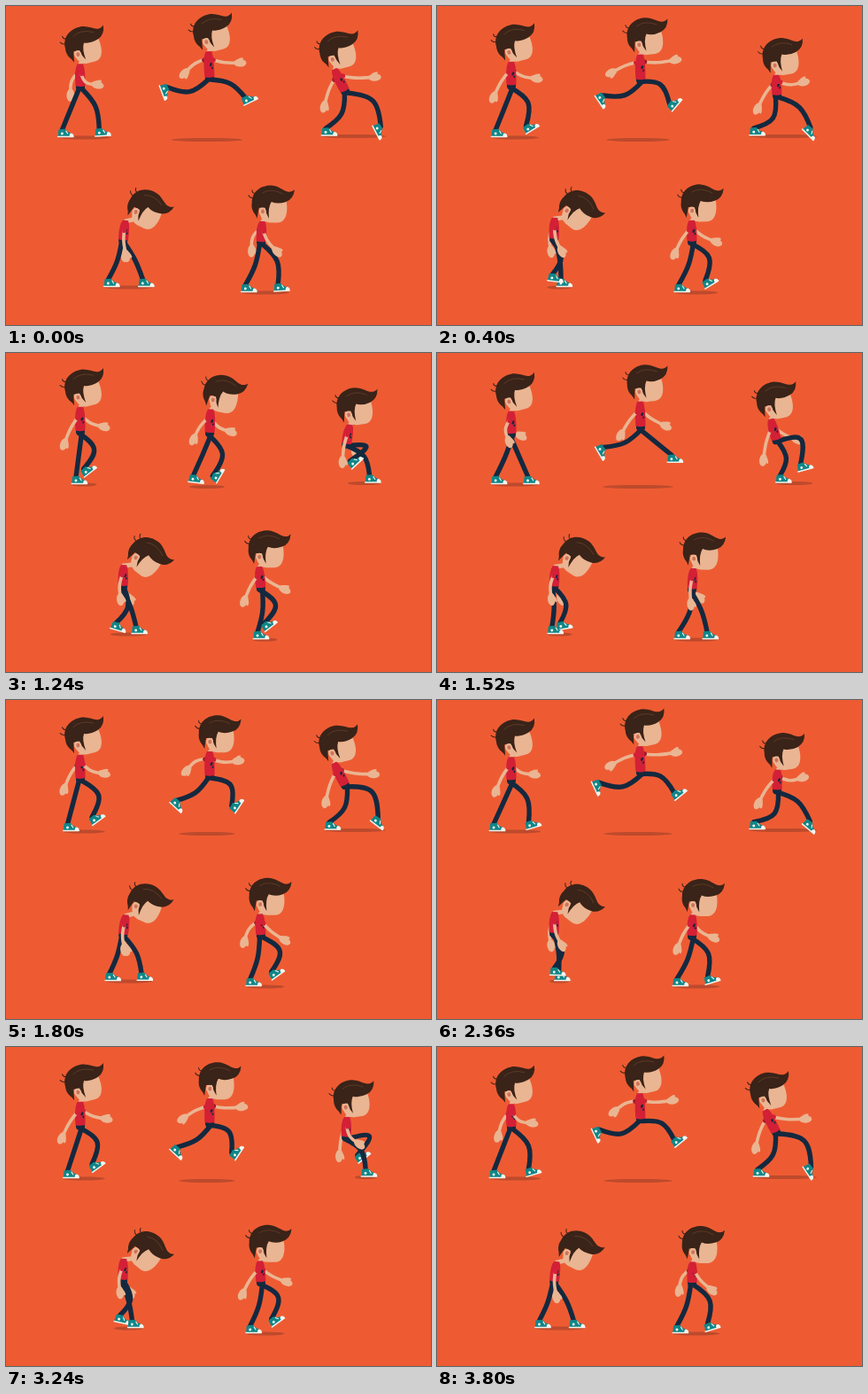
These frames come from a looping animation (480x360 px, 3.84 s). An HTML page with a canvas:

```html
<!DOCTYPE html>
<html lang="en">
<head>
<meta charset="utf-8">
<title>Walk cycles</title>
<style>
html, body { margin: 0; width: 100%; height: 100%; overflow: hidden; background: #ee5b33; }
canvas { display: block; width: 480px; height: 360px; }
</style>
</head>
<body>
<canvas id="stage" width="480" height="360"></canvas>
<script>
const LOOP = 3840, STEP = 40;
const BG = '#ee5b33', SHADE = '#bd4a2c', SKIN = '#eab592', HAIR = '#3a2318', LOCK = '#60402b',
  RED = '#d32036', RED2 = '#9c1a2d', NAVY = '#14293f', TEAL = '#0f8688', WHITE = '#f6f3ec';
const ctx = document.getElementById('stage').getContext('2d');

// Phases run from 0 to 1; wave peaks at `peak`, pulse is its upper half.
const wave = (p, peak = 0) => Math.cos(2 * Math.PI * (p - peak));
const pulse = (p, peak) => Math.max(0, wave(p, peak));
const lunge = p => Math.tanh(2.2 * (wave(p, .105) + .27));

// bob: ear shift x, y, head turn and hip drop, peaking at phase `low` of each step.
// stride, lift, fly: reach and height of the feet; knee: [always, in swing].
// arm: centre, reach, rise, sag and peak of the hand's arc.
const walkers = [
  { // walk
    cycle: 960, ground: 148.5, ear: [81, 52.5], tilt: -14, hip: [84, 92], low: .1, bob: [0, 2.5, 0, 1.5],
    mid: 88, stride: 21, lift: 12.5, toe: 38, heel: 25, knee: [0, 15],
    arm: { x: 87, y: 93, reach: 24, rise: 10, sag: 5, peak: .87, far: [2.5, -2] }
  },
  { // run
    cycle: 960, ground: 151, ear: [230, 47], tilt: -1, hip: [230, 88], low: .5, bob: [4, 6.5, 13, 5],
    mid: 227, stride: 48, lift: 8, fly: 24, toe: 60, heel: 70, knee: [0, 14],
    arm: { x: 231, y: 67, reach: 35, rise: 7, sag: 38, peak: .95, far: [4, -1] }
  },
  { // sneak
    cycle: 3840, ground: 147, ear: [381.5, 67], tilt: -9, hip: [384, 103], low: .46, bob: [13.5, 7, 5, 5],
    mid: 390, stride: 31, swing: lunge, lift: 20, toe: 45, heel: 15, dip: 70, knee: [8, 15],
    arm: { x: 388, y: 96, reach: 29, rise: 17, sag: 24, peak: .03, far: [0, 0] }
  },
  { // trudge
    cycle: 1920, ground: 317.5, ear: [146.5, 231.5], tilt: 32, hip: [132, 266], low: .37, bob: [0, -1, 7, -1],
    mid: 138.5, stride: 19.5, lift: 6, peak: .74, toe: 10, heel: 45, knee: [2, 8], stoop: -6,
    arm: { x: 135, y: 277, reach: 6, rise: 0, sag: 5, peak: .22, far: [0, 0] }
  },
  { // stroll
    cycle: 960, ground: 323.5, ear: [288, 231], tilt: 0, hip: [288, 268], low: .1, bob: [2, 1, 1, .7],
    mid: 292.5, stride: 18.5, lift: 13, toe: 38, heel: 28, knee: [3, 13],
    arm: { x: 291, y: 275, reach: 24, rise: 4, sag: 8, peak: .86, far: [2, -6] }
  }
];

const rad = deg => deg * Math.PI / 180;
const mix = (a, b, k) => [a[0] + (b[0] - a[0]) * k, a[1] + (b[1] - a[1]) * k];
const add = (a, b) => [a[0] + b[0], a[1] + b[1]];
const dist = (a, b) => Math.hypot(b[0] - a[0], b[1] - a[1]);
function turn([x, y], deg) {
  const c = Math.cos(rad(deg)), s = Math.sin(rad(deg));
  return [x * c - y * s, x * s + y * c];
}

function line(color, width, draw) {
  ctx.strokeStyle = color;
  ctx.lineWidth = width;
  ctx.beginPath();
  draw();
  ctx.stroke();
}
function fill(color, draw) {
  ctx.fillStyle = color;
  ctx.beginPath();
  draw();
  ctx.fill();
}
const oval = (color, x, y, rx, ry, a = 0) => fill(color, () => ctx.ellipse(x, y, rx, ry, a, 0, 7));
function local([x, y], angle, draw, scale = 1) {
  ctx.save();
  ctx.translate(x, y);
  ctx.rotate(angle);
  ctx.scale(scale, scale);
  draw();
  ctx.restore();
}

// Rubber limb from a to b, pushed sideways by `bend`; returns its joint.
function limb(a, b, bend, color, width) {
  const k = bend / (dist(a, b) || 1), mid = mix(a, b, .5);
  const joint = add(mid, [(b[1] - a[1]) * k, (a[0] - b[0]) * k]);
  const pull = mix(mid, joint, 1.55);
  line(color, width, () => {
    ctx.moveTo(...a);
    ctx.bezierCurveTo(...mix(pull, a, .15), ...mix(pull, b, .15), ...b);
  });
  return joint;
}

function footAt(w, p) {
  const up = pulse(p, w.peak || .82), fly = w.fly || 0;
  const hop = fly * (.9 + wave(2 * p, .98) - .2 * wave(p));
  const lift = Math.max(0, w.lift * up ** 3 + hop);
  const raised = Math.min(1, lift / 5);
  return {
    at: [w.mid + w.stride * (w.swing || wave)(p), w.ground - 4 - lift],
    lift,
    angle: (w.heel * pulse(p, .52) - w.toe * up) * raised + (w.dip || 0) * pulse(p, .02) ** 3,
    bend: w.knee[0] + w.knee[1] * up + .2 * lift * pulse(p, .45)
  };
}

function handAt(arm, p) {
  const c = wave(p, arm.peak);
  return [arm.x + arm.reach * c, arm.y - arm.rise * c + arm.sag * (1 - c * c)];
}

function leg(hip, foot) {
  const ankle = add(foot.at, turn([-3.5, -5], foot.angle));
  limb(hip, ankle, foot.bend, NAVY, 5.4);
  local(foot.at, rad(foot.angle), () => {
    fill(TEAL, () => {
      ctx.moveTo(-8, 3);
      ctx.lineTo(-7.2, -5);
      ctx.lineTo(-.5, -5.5);
      ctx.quadraticCurveTo(3, -1.5, 6, -1);
      ctx.quadraticCurveTo(9, 0, 9, 3);
    });
    fill(WHITE, () => {
      ctx.moveTo(4.5, 3);
      ctx.quadraticCurveTo(4, -1, 6.5, -1);
      ctx.quadraticCurveTo(9.5, 0, 9, 3);
    });
    oval(WHITE, -3.5, -.5, 1.4, 1.4);
    line(WHITE, 1.4, () => { ctx.moveTo(-8, 2.8); ctx.lineTo(8.5, 2.8); });
    line(WHITE, 1, () => { ctx.moveTo(.8, -3.2); ctx.lineTo(2.5, -.5); });
  }, 1.05);
}

function arm(shoulder, hand, sleeve) {
  const bend = -Math.max(2, (38 - dist(shoulder, hand)) * .5);
  const elbow = limb(shoulder, hand, bend, SKIN, 3.6);
  line(sleeve, 5, () => {
    ctx.moveTo(...shoulder);
    ctx.lineTo(...mix(shoulder, elbow, .3));
  });
  local(hand, Math.atan2(hand[1] - elbow[1], hand[0] - elbow[0]), () => {
    oval(SKIN, 0, .3, 7.2, 4.3);
    oval(SKIN, 0, -3.6, 3.8, 1.6, -.4);
  });
}

function torso(neck, hip) {
  const angle = Math.atan2(hip[1] - neck[1], hip[0] - neck[0]) - Math.PI / 2;
  const hem = dist(neck, hip) - 3;
  local(neck, angle, () => {
    fill(NAVY, () => ctx.roundRect(-5, hem - 3, 10, 8, 3.5));
    fill(RED, () => {
      ctx.moveTo(-3, -1);
      ctx.quadraticCurveTo(-7, 4, -5.5, hem);
      ctx.quadraticCurveTo(0, hem + 1.5, 5.5, hem);
      ctx.quadraticCurveTo(6, 5, 3, -1);
    });
    oval(NAVY, 2, hem * .5, 1.3, 2.2, .4);
    oval(NAVY, 3.4, hem * .64, .9, 1.3, .4);
  });
}

function head(ear, deg) {
  local(ear, rad(deg), () => {
    fill(SKIN, () => {
      ctx.moveTo(-3, -16);
      ctx.lineTo(26, -16);
      ctx.bezierCurveTo(29, -5, 29, 12, 17, 12.5);
      ctx.lineTo(8, 12.5);
      ctx.quadraticCurveTo(0, 12, -3, 3);
    });
    fill(HAIR, () => {
      ctx.moveTo(-6, 8);
      ctx.quadraticCurveTo(-8, 3, -10, 1);
      ctx.quadraticCurveTo(-13, -4, -12, -10);
      ctx.bezierCurveTo(-12, -24, 0, -30, 10, -29.5);
      ctx.bezierCurveTo(19, -29, 24, -23, 29, -22.5);
      ctx.quadraticCurveTo(33, -22, 36, -25);
      ctx.quadraticCurveTo(35, -14, 26, -11);
      ctx.quadraticCurveTo(17, -8, 10, -11);
      ctx.quadraticCurveTo(6, -5, 7.5, 8);
      ctx.quadraticCurveTo(4, 3, 3, -4);
      ctx.lineTo(-4, -4);
    });
    line(HAIR, 1, () => {
      ctx.moveTo(-9, -15);
      ctx.quadraticCurveTo(-14, -14, -16, -18);
      ctx.moveTo(-7, -20);
      ctx.quadraticCurveTo(-12, -20, -12, -24);
    });
    line(LOCK, .8, () => {
      ctx.moveTo(0, -21);
      ctx.quadraticCurveTo(10, -27, 23, -20);
    });
    oval(SKIN, 0, 0, 4, 4.3);
    oval('#cf735b', .3, .2, 2, 2.4);
  });
}

function walker(w, ms) {
  const p = ms / w.cycle % 1, b = wave(2 * p, w.low);
  const [dx, dy, nod, drop] = w.bob;
  const ear = add(w.ear, [dx * b, dy * b]), tilt = w.tilt + nod * b;
  const hip = add(w.hip, [0, drop * b]);
  const neck = add(add(ear, turn([0, 12], tilt)), [w.stoop || 0, 0]);
  const shoulder = mix(neck, hip, .24);
  const far = footAt(w, p), near = footAt(w, p + .5);

  const half = Math.abs(near.at[0] - far.at[0]) / 2 + 9 - .4 * Math.min(near.lift, far.lift);
  oval(SHADE, (near.at[0] + far.at[0]) / 2, w.ground, half, 2.1);

  arm(add(shoulder, [-1, 0]), add(handAt(w.arm, p + .5), w.arm.far), RED2);
  leg(add(hip, [1.5, 0]), far);
  leg(add(hip, [-1.5, 0]), near);
  line(SKIN, 5, () => { ctx.moveTo(...add(ear, turn([4, 7], tilt))); ctx.lineTo(...neck); });
  torso(neck, hip);
  arm(shoulder, handAt(w.arm, p), RED);
  head(ear, tilt);
}

function frame() {
  const ms = Math.floor(performance.now() % LOOP / STEP) * STEP;
  ctx.lineCap = ctx.lineJoin = 'round';
  ctx.fillStyle = BG;
  ctx.fillRect(0, 0, 480, 360);
  walkers.forEach(w => walker(w, ms));
  requestAnimationFrame(frame);
}
frame();
</script>
</body>
</html>
```
